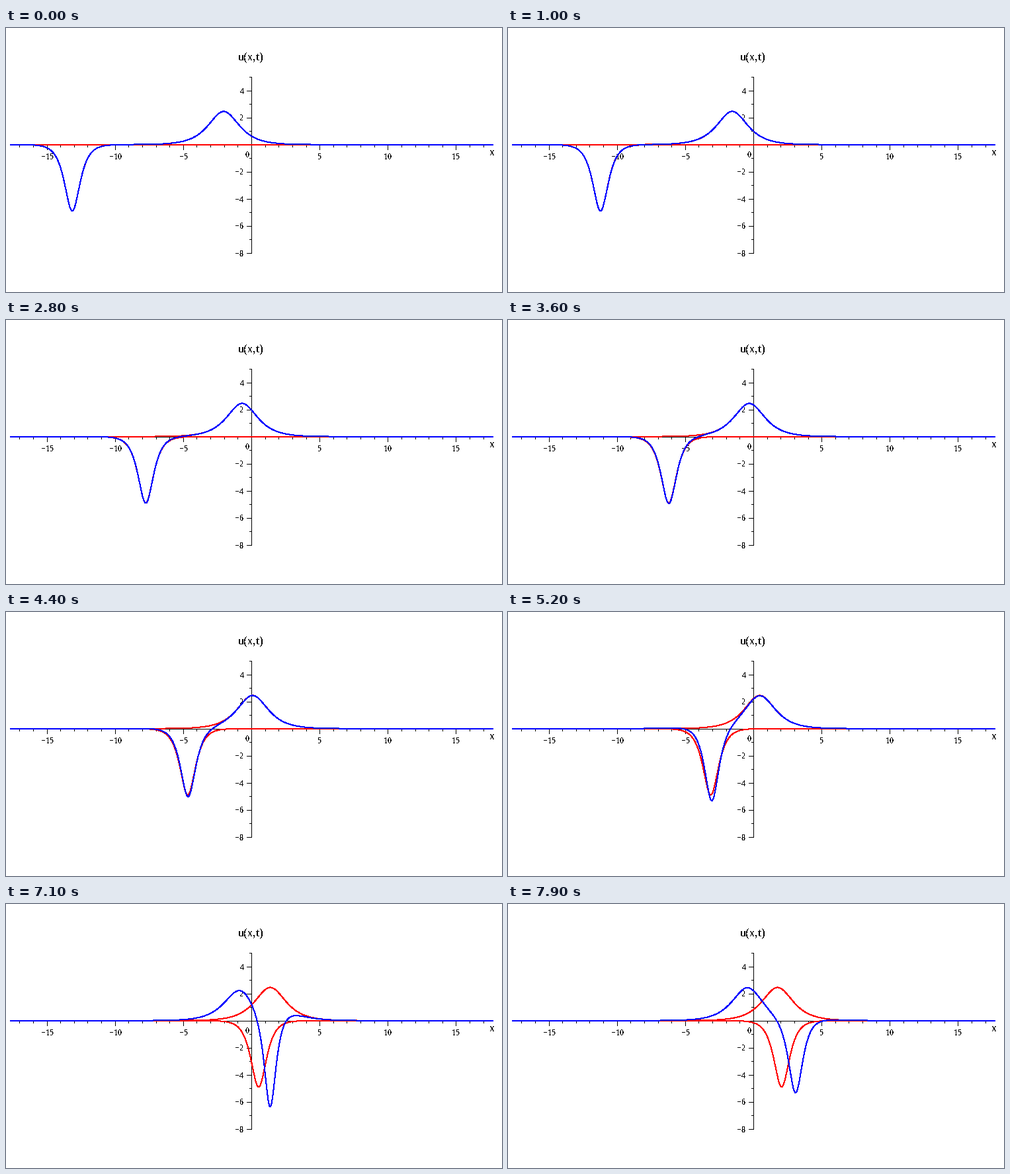
A matplotlib script that plays this animation: 750 px wide and 400 px high, repeating every 8000 ms.

```python
import numpy as np
import matplotlib.pyplot as plt
from matplotlib.animation import FuncAnimation

plt.rcParams.update({
    "font.family": "Liberation Serif",
    "text.antialiased": False,
    "text.hinting": "native",
    "text.hinting_factor": 1,
})

W, H, DPI = 750, 400, 100
PX = 72 / DPI                      # points per pixel
X0, Y0 = 371.5, 176.7              # origin on the stage
SX, SY = 20.63, 20.53              # pixels per unit
FRAMES, INTERVAL = 80, 100
DT, MID = 0.0481, 65.5             # time step, frame of full overlap

fig = plt.figure(figsize=(W / DPI, H / DPI), dpi=DPI, facecolor="white")
ax = fig.add_axes([0, 0, 1, 1])
ax.set(xlim=(0, W), ylim=(H, 0))
ax.axis("off")


def stroke(xs, ys):
    ax.plot(xs, ys, color="black", lw=PX, snap=False,
            solid_capstyle="butt", zorder=1)


def label(x, y, text, size=13, ha="center"):
    ax.text(x, y, text, fontsize=size * PX, ha=ha, va="baseline", zorder=2)


def number(n):
    return str(n).replace("-", "\u2212")


def draw_axes():
    row = np.round(Y0) + 0.5
    stroke([7, 737], [row, row])
    stroke([X0, X0], [74, 342])
    for n in range(-17, 18):
        x = np.floor(X0 + n * SX) + 0.5
        major = n % 5 == 0
        stroke([x, x], [177, 185 if major else 181])
        if major and n:
            label(x, 199, number(n))
    for n in range(-8, 6):
        y = np.round(Y0 - n * SY) + 0.5
        major = n % 2 == 0
        stroke([364 if major else 368, 372], [y, y])
        if major and n:
            label(359.5, y + 4, number(n), ha="right")
    label(364.5, 196, "0")
    label(370.5, 49, "u(x,t)", 18)
    label(735, 193, "x", 18)


def slow(x, t):
    return np.sqrt(6) / np.cosh(x - t - np.log(3))


def fast(x, t):
    return -2 * np.sqrt(6) / np.cosh(2 * x - 8 * t + np.log(3))


def pair(x, t):
    """Two-soliton solution of u_t + u^2 u_x + u_xxx = 0."""
    p, q = x - t, 2 * x - 8 * t
    a, b = (p - q) / 2, (p + q) / 2
    ca, sa, cb, sb = np.cosh(a), np.sinh(a), np.cosh(b), np.sinh(b)
    return -3 * np.sqrt(6) * (ca * cb + 3 * sa * sb) / (cb**2 + 9 * sa**2)


draw_axes()
xs = np.linspace(-17.67, 17.67, 700)
waves = [(slow, "#ff0000"), (fast, "#ff0000"), (pair, "#0000ff")]
# Without antialiasing every touched pixel is filled, so 1 px shows as 2.
lines = [ax.plot([], [], color=c, lw=PX, antialiased=False, snap=False,
                 solid_capstyle="butt", zorder=3 + i)[0]
         for i, (_, c) in enumerate(waves)]


def update(i):
    t = (i - MID) * DT
    for line, (wave, _) in zip(lines, waves):
        line.set_data(X0 + SX * xs, Y0 - SY * wave(xs, t))
    return lines


anim = FuncAnimation(fig, update, frames=FRAMES, interval=INTERVAL,
                     repeat=True, repeat_delay=0, blit=False)
plt.show()
```
